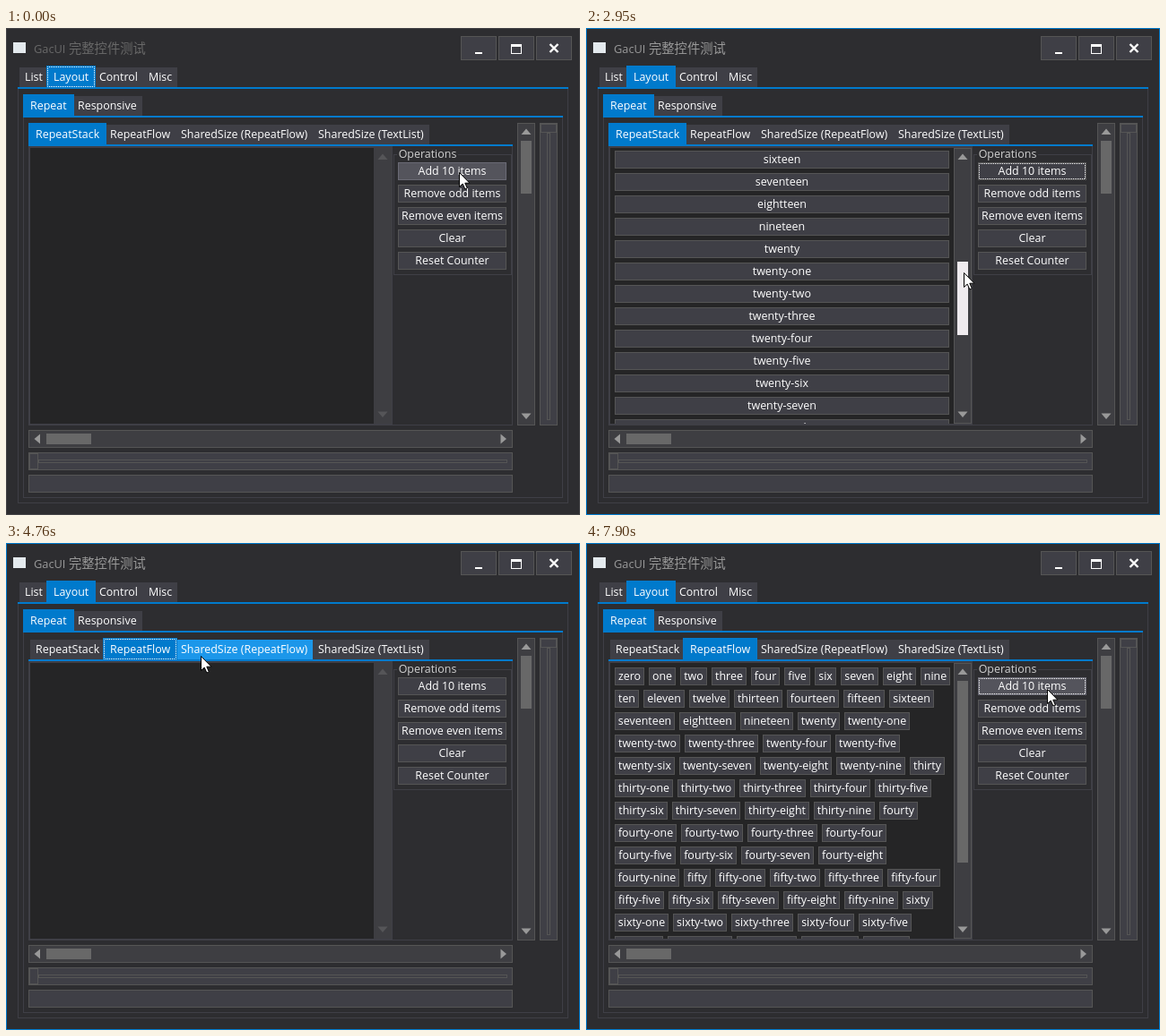
An HTML page with a canvas that plays this animation: 640x544 px, repeating every 8000 ms.

```html
<!DOCTYPE html>
<html lang="zh">
<head>
<meta charset="utf-8">
<title>GacUI</title>
<style>
html, body { margin: 0; width: 640px; height: 544px; overflow: hidden; background: #2d2d30; }
canvas { display: block; }
</style>
</head>
<body>
<canvas id="stage" width="640" height="544"></canvas>
<script>
const g = document.getElementById('stage').getContext('2d');
const LOOP = 8000, ACTIVATE = 460, SWITCH = 4510;
const BLUE = '#007acc', LIGHT_BLUE = '#1c97ea', FACE = '#3f3f46', EDGE = '#555555', BACK = '#2d2d30';
const FONT = '12.45px "Open Sans", "Noto Sans", sans-serif';
const DRAG = { start: 2250, end: 3970, y: 166.3 };

// "Add 10 items" is clicked at a steady pace on the first page, in pairs on the second
const HOLD = 140;
const stackClicks = Array.from({ length: 4 }, (_, i) => ACTIVATE + i * 480);
const flowClicks = Array.from({ length: 8 }, (_, i) => 5320 + (i >> 1) * 707 + (i % 2) * 310);

// Pointer moves: start, end, x, y
const moves = [
  [2040, 2360, 413, 161],
  [2410, 2950, 421, 273],
  [3000, 3460, 405, 393],
  [3610, 3970, 404, 139],
  [4020, 4400, 150, 119],
  [4600, 5200, 525, 158],
  [7440, 7850, 514, 163]
];

const small = ('zero one two three four five six seven eight nine ten eleven twelve thirteen ' +
  'fourteen fifteen sixteen seventeen eightteen nineteen').split(' ');
const tens = 'twenty thirty fourty fifty sixty seventy'.split(' ');
const word = n => n < 20 ? small[n] : tens[Math.floor(n / 10) - 2] + (n % 10 ? '-' + small[n % 10] : '');

const clamp = (v, lo, hi) => Math.min(hi, Math.max(lo, v));
const inside = (p, x, y, w, h) => p.x >= x && p.x < x + w && p.y >= y && p.y < y + h;

function pointer(t) {
  let x = 505, y = 161;
  for (const [start, end, tx, ty] of moves) {
    const u = clamp((t - start) / (end - start), 0, 1), k = u * u * (3 - 2 * u);
    x += (tx - x) * k;
    y += (ty - y) * k;
  }
  return { x: Math.round(x), y: Math.round(y) };
}

function fill(color, x, y, w, h) {
  g.fillStyle = color;
  g.fillRect(x, y, w, h);
}

function frame(color, x, y, w, h) {
  g.strokeStyle = color;
  g.lineWidth = 1;
  g.strokeRect(x + .5, y + .5, w - 1, h - 1);
}

function box(x, y, w, h, face = FACE, edge = EDGE) {
  fill(face, x, y, w, h);
  frame(edge, x, y, w, h);
}

function dotted(x, y, w, h) {
  g.setLineDash([1, 1]);
  g.lineDashOffset = .5;
  frame('#fff', x, y, w, h);
  g.setLineDash([]);
}

function text(s, x, base, color = '#fff', align = 'center', font = FONT) {
  g.font = font;
  g.textAlign = align;
  g.fillStyle = color;
  g.fillText(s, x, base);
}

function textWidth(s) {
  g.font = FONT;
  return Math.round(g.measureText(s).width);
}

function outline(points) {
  g.beginPath();
  points.forEach(([x, y]) => g.lineTo(x, y));
  g.closePath();
}

function button(label, x, y, w, state) {
  if (state === 'down') box(x, y, w, 20, BLUE, LIGHT_BLUE);
  else if (state === 'hot') box(x, y, w, 20, '#54545c', '#6a6a75');
  else box(x, y, w, 20);
  text(label, x + w / 2, y + 14);
}

// Tab heads over a page; (x, y) is the top left corner
function tabs(labels, selected, x, y, right, bottom, p, focus) {
  frame(FACE, x, y + 24, right - x, bottom - y - 24);
  let tx = x + 8;
  const heads = labels.map(label => {
    const head = { label, x: tx, w: textWidth(label) };
    tx += head.w + 12;
    return head;
  });
  heads.forEach(({ x, w }, i) => {
    const hot = i !== selected && inside(p, x - 6, y + 2, w + 12, 22);
    fill(hot ? LIGHT_BLUE : FACE, x - 6, y + 2, w + 12, 22);
  });
  const open = heads[selected];
  fill(BLUE, open.x - 8, y, open.w + 16, 24);
  if (focus) dotted(open.x - 7, y + 1, open.w + 14, 23);
  heads.forEach(({ label, x }) => text(label, x, y + 16.5, '#fff', 'left'));
  fill(BLUE, x, y + 24, right - x, 2);
}

// Bars are drawn lying down; upright ones swap the axes
function place(x, y, upright, paint) {
  g.save();
  if (upright) g.transform(0, 1, 1, 0, x, y);
  else g.translate(x, y);
  paint();
  g.restore();
}

function arrow(x, dir, color) {
  g.fillStyle = color;
  outline([[x + dir * 3, 10], [x - dir * 3.5, 4.5], [x - dir * 3.5, 15.5]]);
  g.fill();
}

function scrollBar(length, pos, thumb, color = '#686868') {
  const arrows = thumb ? '#999' : '#555558';
  box(0, 0, length, 20, '#3e3e42', thumb ? EDGE : '#3e3e42');
  arrow(9.5, -1, arrows);
  arrow(length - 10, 1, arrows);
  fill(color, 20 + pos, 4, thumb, 12);
}

function slider(length) {
  box(0, 0, length, 20);
  frame(EDGE, 11, 8, length - 17, 4);
  box(1, 1, 10, 18);
}

function outerBars() {
  place(570, 106, true, () => scrollBar(338, 0, 59));
  place(595, 106, true, () => slider(338));
  place(25, 449, false, () => scrollBar(540, 0, 50));
  place(25, 474, false, () => slider(540));
  box(25, 499, 540, 20);
}

function titleBar(active) {
  const color = active ? '#999999' : '#686868';
  fill('#e4eaee', 8, 16, 14, 12);
  text('GacUI', 31, 28, color, 'left', '12.8px "Open Sans", sans-serif');
  text('完整控件测试', 70, 28, color, 'left', '14.3px "Noto Sans CJK SC", "Noto Sans CJK", sans-serif');
  [507, 549, 591].forEach(x => box(x, 9, 40, 27));
  fill('#fff', 523, 27, 8, 2);
  frame('#fff', 563, 18, 12, 11);
  fill('#fff', 563, 18, 12, 3);
  g.lineWidth = 2.4;
  g.beginPath();
  for (const d of [-4.5, 4.5]) {
    g.moveTo(611 - d, 18);
    g.lineTo(611 + d, 27);
  }
  g.stroke();
}

const stack = count => Array.from({ length: count },
  (_, n) => ({ label: word(n), x: 32, y: 139 + n * 25, w: 373 }));

// Left to right with wrapping
function flow(count) {
  let x = 32, y = 139;
  return Array.from({ length: count }, (_, n) => {
    const label = word(n), w = textWidth(label) + 8;
    if (x + w > 406) { x = 32; y += 25; }
    const item = { label, x, y, w };
    x += w + 5;
    return item;
  });
}

function itemList(t, items, p) {
  const view = 308, track = 267;
  const content = items.length ? items[items.length - 1].y - 109 : 0;
  const hidden = Math.max(0, content - view);
  const thumb = hidden ? Math.round(track * view / content) : 0;
  const dragging = t >= DRAG.start && t < DRAG.end;
  const pos = dragging ? clamp(p.y - DRAG.y, 0, track - thumb) : 0;
  const offset = Math.round(pos / (track - thumb) * hidden);

  fill(FACE, 25, 132, 406, 311);
  fill('#252526', 27, 134, 383, view);
  g.save();
  g.beginPath();
  g.rect(27, 134, 383, view);
  g.clip();
  for (const { label, x, y, w } of items) {
    const hot = !dragging && inside(p, x, y - offset, w, 20);
    button(label, x, y - offset, w, hot ? 'hot' : '');
  }
  g.restore();

  const over = inside(p, 414, 154 + pos, 12, thumb);
  const held = t >= DRAG.start && t < DRAG.end + 50;
  const color = dragging && over ? '#efebef' : held || over ? '#9e9e9e' : '#686868';
  place(410, 134, true, () => scrollBar(view, Math.round(pos), thumb, color));
}

function operations(t, clicks, p) {
  frame(FACE, 432, 141, 132, 135);
  fill(BACK, 436, 136, 68, 10);
  text('Operations', 470, 145, '#d0d0d0');
  const down = clicks.some(c => t >= c && t < c + HOLD);
  ['Add 10 items', 'Remove odd items', 'Remove even items', 'Clear', 'Reset Counter'].forEach((label, i) => {
    const y = 150 + i * 25, hot = inside(p, 437, y, 121, 20);
    button(label, 437, y, 121, i === 0 && down ? 'down' : hot ? 'hot' : '');
  });
  if (t >= clicks[0]) dotted(438, 151, 119, 18);
}

function cursor({ x, y }) {
  g.save();
  g.translate(x + .5, y + .5);
  outline([[0, 0], [0, 16], [3.7, 12.6], [6.4, 18.5], [8.8, 17.4], [6.3, 11.7], [11.4, 11.7]]);
  g.fillStyle = '#fff';
  g.fill();
  g.strokeStyle = '#000';
  g.lineWidth = 1;
  g.stroke();
  g.restore();
}

function draw(t) {
  const p = pointer(t), active = t >= ACTIVATE, onFlow = t >= SWITCH;
  const clicks = onFlow ? flowClicks : stackClicks;
  const count = 10 * clicks.filter(c => t >= c + HOLD).length;

  fill(BACK, 0, 0, 640, 544);
  frame(active ? BLUE : '#434346', 0, 0, 640, 544);
  titleBar(active);
  tabs(['List', 'Layout', 'Control', 'Misc'], 1, 13, 42, 627, 531, p, !active);
  tabs(['Repeat', 'Responsive'], 0, 19, 74, 621, 525, p);
  tabs(['RepeatStack', 'RepeatFlow', 'SharedSize (RepeatFlow)', 'SharedSize (TextList)'],
    onFlow ? 1 : 0, 25, 106, 565, 444, p, onFlow && t < clicks[0]);
  itemList(t, onFlow ? flow(count) : stack(count), p);
  operations(t, clicks, p);
  outerBars();
  cursor(p);
}

const start = performance.now();
function tick() {
  draw((performance.now() - start) % LOOP);
  requestAnimationFrame(tick);
}
tick();
</script>
</body>
</html>
```
